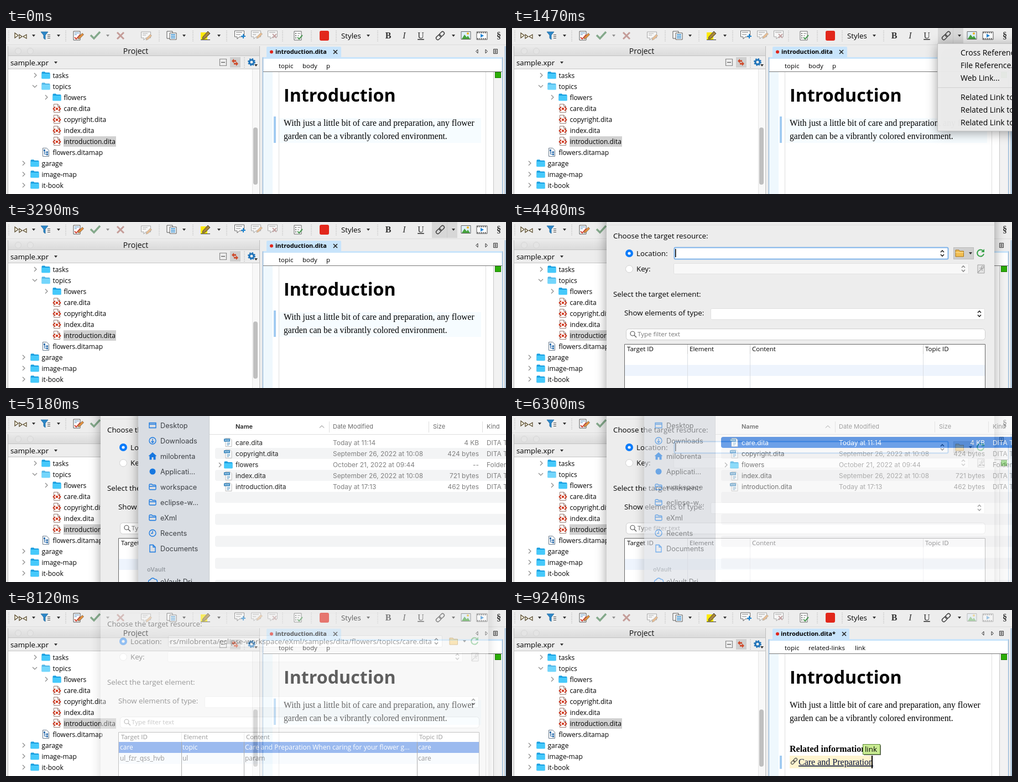
An HTML page that plays this animation: 904 px wide and 302 px high, repeating every 9590 ms.

```html
<!DOCTYPE html>
<html lang="en">
<head>
<meta charset="utf-8">
<title>Adding a related link</title>
<style>
html, body { margin: 0; width: 100%; height: 100%; overflow: hidden; background: #ededed; }
body > svg { display: block; width: 100vw; height: 100vh; }
text { font: 500 12px "Open Sans", sans-serif; white-space: pre; }
.ui text, text.ui { font-size: 13.3px; }
.small text, text.small { font-size: 11.5px; }
.menu text { font-size: 14px; }
.serif text { font: 16px "Liberation Serif", serif; }
.serif .para { font-size: 15.65px; }
.serif .bold { font-weight: 700; }
.tab text { font-size: 10.9px; font-weight: 700; }
.side text { font: 12.7px Inter, sans-serif; fill: #3d4045; }
.files text { font: 11.9px Inter, sans-serif; fill: #252525; }
.files .dim text { fill: #808080; }
.files .head text { font-size: 11px; fill: #6d6d6d; }
.line { fill: none; stroke: #555; stroke-width: 1.2; }
.line.pale { stroke: #888; }
.line.cross { stroke: #222; stroke-width: 1.6; }
.blue { fill: none; stroke: #1677e0; stroke-width: 1.3; }
.off { opacity: .5; }
.shadow { filter: drop-shadow(0 3px 10px rgba(0, 0, 0, .38)); }

/* Hard cuts on one shared timeline. */
[class*="at-"] { animation: 9.59s step-end infinite; opacity: 0; }
.at-button { animation-name: button; }
.at-menu { animation-name: menu; }
.at-item1 { animation-name: item1; }
.at-item2 { animation-name: item2; }
.at-item3 { animation-name: item3; }
.at-item4 { animation-name: item4; }
.at-dialog { animation-name: dialog; }
.at-caret { animation-name: caret; }
.at-browse { animation-name: browse; }
.at-finder { animation-name: finder; }
.at-picked { animation-name: picked; }
.at-path { animation-name: path; }
.at-focus { animation-name: focus; }
.at-marked { animation-name: marked; }
.at-rows { animation-name: rows; }
.at-before { animation-name: before; }
.at-after { animation-name: after; }
.at-end { animation-name: end; }
@keyframes button { 0% { opacity: 0 } 11.678% { opacity: 1 } 84.671%, 100% { opacity: 0 } }
@keyframes menu { 0% { opacity: 0 } 14.598% { opacity: .7 } 15.327% { opacity: 1 } 33.576% { opacity: .45 } 34.306%, 100% { opacity: 0 } }
@keyframes item1 { 0% { opacity: 0 } 20.437% { opacity: 1 } 22.627%, 100% { opacity: 0 } }
@keyframes item2 { 0% { opacity: 0 } 22.627% { opacity: 1 } 24.087%, 100% { opacity: 0 } }
@keyframes item3 { 0% { opacity: 0 } 24.087% { opacity: 1 } 26.277%, 100% { opacity: 0 } }
@keyframes item4 { 0% { opacity: 0 } 28.467% { opacity: 1 } 34.306%, 100% { opacity: 0 } }
@keyframes dialog { 0% { opacity: 0 } 35.036% { opacity: .6 } 35.766% { opacity: 1 } 84.671% { opacity: .4 } 85.4%, 100% { opacity: 0 } }
@keyframes caret { 0% { opacity: 1 } 40.875% { opacity: 0 } 45.985% { opacity: 1 } 66.423%, 100% { opacity: 0 } }
@keyframes browse { 0% { opacity: 0 } 43.065% { opacity: .6 } 45.985% { opacity: 1 } 66.423%, 100% { opacity: 0 } }
@keyframes finder { 0% { opacity: 0 } 49.635% { opacity: .2 } 50.364% { opacity: .45 } 51.094% { opacity: .7 } 51.824% { opacity: .9 } 52.554% { opacity: 1 } 65.693% { opacity: .6 } 66.423% { opacity: .25 } 67.153%, 100% { opacity: 0 } }
@keyframes picked { 0% { opacity: 0 } 62.043%, 100% { opacity: 1 } }
@keyframes path { 0% { opacity: 0 } 66.423%, 100% { opacity: 1 } }
@keyframes focus { 0% { opacity: 1 } 83.211%, 100% { opacity: 0 } }
@keyframes marked { 0% { opacity: 0 } 66.423% { opacity: 1 } 83.211%, 100% { opacity: 0 } }
@keyframes rows { 0% { opacity: 0 } 72.262%, 100% { opacity: 1 } }
@keyframes before { 0% { opacity: 1 } 89.78%, 100% { opacity: 0 } }
@keyframes after { 0% { opacity: 0 } 89.78%, 100% { opacity: 1 } }
@keyframes end { 0% { opacity: 0 } 96.35%, 100% { opacity: 1 } }
</style>
</head>
<body>
<svg viewBox="0 0 904 302" preserveAspectRatio="none">
<defs>
  <path id="down" d="M-3-2h6L0 2z" fill="#333"/>
  <path id="sep" d="M0-9V10" stroke="#999" stroke-dasharray="1 2"/>
  <path id="closed" class="line pale" d="M-2-4l4 4-4 4"/>
  <path id="open" class="line pale" d="M-4-2l4 4 4-4"/>
  <g id="folder"><path d="M-7.5-5q0-1.5 1.5-1.5h4L-.5-5H6q1.500 0 1.500 1.500V6h-15z" fill="#1b9fe0"/><path d="M-7.500-3h15v8q0 1.500-1.500 1.500H-6q-1.500 0-1.500-1.500z" fill="#45c9fb"/></g>
  <g id="dita"><path d="M-5.5-7.5h7l4 4v11h-11z" fill="#fff" stroke="#9a7b72"/><path d="M1.500-7.500v4h4" fill="none" stroke="#9a7b72"/><path d="M-3-2.500L-6.500 1-3 4.500M3-2.500L6.500 1 3 4.500" fill="none" stroke="#c8371f" stroke-width="1.800"/><circle cy="1" r="2.300" fill="#d5432a"/></g>
  <g id="map"><path d="M-5.5-7.5h7l4 4v11h-11z" fill="#fff" stroke="#66788a"/><path d="M-2.5-4v7.500h4M-2.500 0h4" fill="none" stroke="#2b6cab"/><path d="M-4-5h3v3h-3zM1-1.500h3v3H1zM1 2.500h3v3H1z" fill="#2b6cab"/></g>
  <path id="bubble" d="M-8.500-8h17V3H0l-4 4V3h-4.500z" fill="#fff" stroke="#666"/>
  <path id="pencil" d="M-4 4l1-3.500L4-6.500 6.500-4-.500 3z" fill="#e89139" stroke="#6b5a45" stroke-width=".8"/>
  <g id="chain" fill="none" stroke="#444" stroke-width="1.300" transform="rotate(-45)"><rect x="-8" y="-2.700" width="9" height="5.400" rx="2.700"/><rect x="-1" y="-2.700" width="9" height="5.400" rx="2.700"/></g>
  <path id="spin" d="M-3-2L0-5l3 3M-3 2l3 3 3-3" fill="none" stroke="#222" stroke-width="1.600"/>
  <path id="sidefolder" class="blue" d="M-6-3.500q0-1.500 1.500-1.500h3L0-3.500h4.500Q6-3.500 6-2v5.500Q6 5 4.500 5h-9Q-6 5-6 3.500zM-6-1H6"/>
  <g id="file"><path d="M-5-7.500H3l3 3v12H-5z" fill="#fff" stroke="#aaa" stroke-width=".8"/><path d="M-8-6.500H3v5H-8z" fill="#2378b5"/><path d="M-6.500-4h8" stroke="#d7ecfa" stroke-width="2" stroke-dasharray="1.500 .7"/><path d="M-2.500 1H3M-2.500 3H3M-2.500 5H1" stroke="#4a8dbb" stroke-width=".9"/></g>
  <pattern id="stripes" patternUnits="userSpaceOnUse" x="378" y="58" width="540" height="40"><rect width="540" height="20" rx="4" fill="#f3f4f5"/></pattern>
  <linearGradient id="bar" x2="0" y2="1"><stop stop-color="#e9e9e9"/><stop offset="1" stop-color="#dadada"/></linearGradient>
</defs>

<rect width="904" height="302" fill="#ededed"/>

<!-- Toolbar -->
<path d="M0 30.5H904" stroke="#dcdcdc"/>
<g>
  <use href="#sep" x="5" y="14"/><use href="#sep" x="108" y="14"/><use href="#sep" x="277" y="14"/><use href="#sep" x="338" y="14"/><use href="#sep" x="399" y="14"/><use href="#sep" x="500" y="14"/><use href="#sep" x="552" y="14"/><use href="#sep" x="597" y="14"/><use href="#sep" x="672" y="14"/>
  <path d="M16 9v9l6-4.500zM24 12v7l5-3.500zM37 12v7l-6-3.500z" fill="#fffbe8" stroke="#54462a" stroke-width="1.200"/>
  <path d="M63 7h13l-5 6v8l-3-2.500V13z" fill="#2d87c8" stroke="#1d679f" stroke-width=".8"/><path d="M75 12.500h5M75 15.500h5M75 18.500h5" stroke="#555"/>
  <path d="M122 6h12v16h-12z" fill="#fff" stroke="#555"/><path d="M124 9h8M124 12h4" stroke="#4280b9"/><path d="M124 17l3 3 7-8" stroke="#d33c2c" stroke-width="1.800" fill="none"/><use href="#pencil" x="134" y="16"/>
  <path d="M153 13l6 6L170 7" fill="none" stroke="#84a98b" stroke-width="3.500"/>
  <path d="M201 8l12 12M213 8l-12 12" stroke="#c49c98" stroke-width="3"/>
  <g class="off"><use href="#bubble" x="253" y="15"/><path d="M247 10h9M247 13h6" stroke="#777"/><use href="#pencil" x="257" y="18"/></g>
  <path d="M291 6h10v13h-10z" fill="#fff" stroke="#555"/><path d="M296 9h12v12h-12z" fill="#fff" stroke="#555"/><path d="M298 12h8M298 15h8M298 18h8" stroke="#2987cb" stroke-width="1.300"/>
  <path d="M352 8h12v13h-12z" fill="#ffe900"/><path d="M356 16l9-10 4 4-9 9-5 1z" fill="#a8863c" stroke="#444"/><path d="M352 21.500h17" stroke="#333"/>
  <use href="#bubble" x="422" y="13"/><path d="M416 8h11M416 12h8" stroke="#777"/><path d="M429 11v8M425 15h8" stroke="#1e85d2" stroke-width="2"/>
  <g class="off"><g fill="#ddd"><use href="#bubble" x="452" y="13"/><use href="#bubble" x="482" y="13"/></g><path d="M446 8h11M446 12h6M476 8h11" stroke="#555"/><use href="#pencil" x="457" y="15"/><path d="M482 11l7 7M489 11l-7 7" stroke="#955" stroke-width="1.800"/></g>
  <path d="M521 6h13v16h-13z" fill="#fff" stroke="#666"/><path d="M523 10h2M523 14h2M523 18h2" stroke="#777" stroke-width="2"/><path d="M527 10h5M527 14h3" stroke="#777"/><path d="M527 17l3 3 6-7" fill="none" stroke="#4d9956" stroke-width="2"/>
  <rect x="567" y="5" width="17" height="18" rx="3" fill="#e2271b"/>
  <text class="ui" x="606" y="19">Styles</text>
</g>
<g class="at-button"><rect x="770" width="46" height="29" fill="#d7d7d7"/><path d="M797.5 0v29" stroke="#cacaca"/></g>
<g class="serif" text-anchor="middle" fill="#333"><text class="bold" x="691" y="19">B</text><text x="720" y="19" style="font-style:italic">I</text><text x="750" y="19" text-decoration="underline">U</text><text class="bold" x="891" y="19">§</text></g>
<use href="#chain" transform="translate(785 14) scale(1.15)"/>
<use href="#down" x="50" y="14"/><use href="#down" x="95" y="14"/><use href="#down" x="184" y="14" class="off"/><use href="#down" x="322" y="14"/><use href="#down" x="385" y="14"/><use href="#down" x="655" y="14"/><use href="#down" x="809" y="14"/>
<path d="M823 6.5h17v14h-17z" fill="#dff0fb" stroke="#666"/><path d="M824 20l5-8 4 5 2-3 4 6z" fill="#46a33d"/><circle cx="835" cy="10" r="2" fill="#eeb31d"/>
<path d="M851 7h19v14h-19z" fill="#fff" stroke="#555"/><path d="M852 8.5h17M852 19.5h17" stroke="#555" stroke-width="2" stroke-dasharray="2 1.5"/><path d="M858 10.5v7l6-3.5z" fill="#2384d4"/>
<path class="at-after" d="M821 4h51v20h-51z" fill="#ededed" fill-opacity=".62"/>

<!-- Project view -->
<path d="M3.5 33v269M458.5 33v269" stroke="#bdbdbd"/>
<rect x="4" y="33" width="454" height="18" fill="url(#bar)"/>
<g fill="#e4e4e4" stroke="#d6d6d6"><circle cx="22" cy="42" r="5.5"/><circle cx="44" cy="42" r="5.5"/></g>
<text x="234.5" y="47" text-anchor="middle" style="font-size:14px" fill="#111">Project</text>
<path d="M4 50.5h454" stroke="#c4c4c4"/>
<text class="ui" x="8" y="68">sample.xpr</text><use href="#down" x="90" y="63"/>
<rect x="405" y="53" width="19" height="19" fill="#cfcfcf"/>
<path class="line pale" d="M386.5 56.500h12v12h-12z"/><path class="line" d="M389 62.500h7"/>
<path d="M408 60l4-4v2.500h4v3h-4V64zM420 65l-4-4v2.500h-4v3h4V69z" fill="#cf4a2a"/>
<use href="#sep" x="431" y="62"/>
<circle cx="444" cy="62" r="4" fill="none" stroke="#1e72b8" stroke-width="3"/><circle cx="444" cy="62" r="6" fill="none" stroke="#1e72b8" stroke-width="2" stroke-dasharray="2.4 2.312"/><use href="#down" x="452" y="68"/>
<rect x="4" y="75" width="454" height="227" fill="#fff"/>
<path d="M4 74.5h454" stroke="#c4c4c4"/>
<rect x="446" y="75" width="11" height="227" fill="#f8f8f8"/><path d="M445.5 75v227" stroke="#e6e6e6"/>
<rect x="447" y="181" width="8" height="104" rx="4" fill="#bfbfbf"/>
<rect x="104" y="197" width="95" height="19" fill="#d1d1d1"/>
<g>
  <use href="#closed" x="53" y="86"/><use href="#folder" x="72" y="86"/><text x="84.5" y="91">tasks</text>
  <use href="#open" x="52" y="106"/><use href="#folder" x="72" y="106" opacity=".75"/><text x="84.5" y="111">topics</text>
  <use href="#closed" x="73" y="126"/><use href="#folder" x="92" y="126"/><text x="104.5" y="131">flowers</text>
  <use href="#dita" x="92" y="146"/><text x="104.5" y="151">care.dita</text>
  <use href="#dita" x="92" y="166"/><text x="104.5" y="171">copyright.dita</text>
  <use href="#dita" x="92" y="186"/><text x="104.5" y="191">index.dita</text>
  <use href="#dita" x="92" y="206"/><text x="104.5" y="211">introduction.dita</text>
  <use href="#map" x="72" y="226"/><text x="84.5" y="231">flowers.ditamap</text>
  <use href="#closed" x="32" y="246"/><use href="#folder" x="52" y="246"/><text x="64.5" y="251">garage</text>
  <use href="#closed" x="32" y="266"/><use href="#folder" x="52" y="266"/><text x="64.5" y="271">image-map</text>
  <use href="#closed" x="32" y="286"/><use href="#folder" x="52" y="286"/><text x="64.5" y="291">it-book</text>
</g>

<!-- Editor -->
<path d="M471 54V36q0-2 2-2h131q2 0 2 2v18z" fill="#c8e4fb"/>
<rect x="464" y="53" width="434" height="249" fill="#fff"/>
<path d="M464.5 302V54H897.5V302M902.5 33v269" fill="none" stroke="#8fb4d6" stroke-width="1.5"/>
<rect x="465" y="53" width="432" height="3" fill="#c8e4fb"/>
<path d="M465 79.5H897" stroke="#777"/>
<circle cx="480" cy="43.5" r="3" fill="#e0261c"/>
<path d="M853 39v7l-3.500-3.500zM867 39v7l3.500-3.500z" fill="none" stroke="#333"/>
<path d="M881.5 38.500h7v8h-7zM883 40.500h4M883 42.500h4M883 44.500h4" fill="none" stroke="#333"/>
<rect x="465" y="80" width="17" height="222" fill="#eff8fd"/>
<path d="M493.5 80v222M867.5 80v222" stroke="#dedede"/><path d="M881.5 80v222" stroke="#c7c7c7"/>
<rect x="882" y="80" width="15" height="222" fill="#f2f2f2"/>
<rect x="884.5" y="80.5" width="10" height="10" fill="#2bae08" stroke="#1c7d03"/>
<g class="at-before">
  <g class="tab"><text x="487" y="47">introduction.dita</text></g><path class="line cross" d="M592 40l7 7M599 40l-7 7"/>
  <g class="small"><text x="493" y="73">topic</text><text x="536" y="73">body</text><text x="579" y="73">p</text></g>
  <rect x="494" y="164" width="365" height="45" fill="#f6fcff"/><rect x="484" y="161" width="4" height="48" fill="#a2cbf1"/>
</g>
<g class="at-after">
  <path d="M600 54V34h8q2 0 2 2v18z" fill="#c8e4fb"/>
  <g class="tab"><text x="486" y="47">introduction.dita*</text></g><path class="line cross" d="M597 40l7 7M604 40l-7 7"/>
  <g class="small"><text x="493" y="73">topic</text><text x="536" y="73">related-links</text><text x="620" y="73">link</text></g>
  <rect x="502" y="265" width="150" height="23" fill="#fff4cf"/><rect x="484" y="265" width="4" height="24" fill="#a2cbf1"/>
  <g class="serif"><text class="bold" x="502" y="258">Related information</text><text x="518" y="282" fill="#04123c" text-decoration="underline">Care and Preparation</text></g>
  <use href="#chain" transform="translate(510 275) scale(.85)"/>
  <rect x="636" y="246" width="31" height="18" fill="#666"/><rect x="634.5" y="244.5" width="31" height="18" fill="#c9eb93" stroke="#5d8a36"/><text class="ui" x="638" y="258">link</text>
</g>
<text x="502" y="134" style="font-size:32.2px;font-weight:700">Introduction</text>
<g class="serif"><text class="para" x="502" y="178">With just a little bit of care and preparation, any flower</text><text class="para" x="502" y="202">garden can be a vibrantly colored environment.</text></g>
<rect class="at-end" x="650" y="265" width="2" height="23"/>

<!-- Link menu -->
<g class="at-menu menu">
  <rect class="shadow" x="769.5" y="28.5" width="200" height="159" fill="#ededed" fill-opacity=".96" stroke="#c2c2c2"/>
  <path d="M770 108.5h134" stroke="#d0d0d0"/>
  <text x="811" y="50">Cross Reference...</text><text x="811" y="73">File Reference...</text><text x="811" y="96">Web Link...</text><text x="811" y="131">Related Link to Topic...</text><text x="811" y="154">Related Link to File...</text><text x="811" y="177">Related Link to Web Page...</text>
  <g fill="#fff">
    <g class="at-item1"><rect x="770" y="34" width="134" height="23" fill="#2f7af0"/><text x="811" y="50">Cross Reference...</text></g>
    <g class="at-item2"><rect x="770" y="57" width="134" height="23" fill="#2f7af0"/><text x="811" y="73">File Reference...</text></g>
    <g class="at-item3"><rect x="770" y="80" width="134" height="23" fill="#2f7af0"/><text x="811" y="96">Web Link...</text></g>
    <g class="at-item4"><rect x="770" y="115" width="134" height="23" fill="#2f7af0"/><text x="811" y="131">Related Link to Topic...</text></g>
  </g>
</g>

<!-- Link dialog -->
<g class="at-dialog">
  <rect class="shadow" x="171" y="-30" width="701" height="360" fill="#ededed"/>
  <path d="M171 5.5h701" stroke="#dedede"/>
  <g class="ui"><text x="183" y="30">Choose the target resource:</text><text x="225" y="62">Location:</text><text x="225" y="90">Key:</text><text x="183" y="136">Select the target element:</text><text x="203" y="170">Show elements of type:</text></g>
  <circle cx="212" cy="57" r="7" fill="#0a7bfa"/><circle cx="212" cy="57" r="2.6" fill="#fff"/><circle cx="212" cy="85.5" r="6.5" fill="#fff" stroke="#d2d2d2"/>
  <rect x="293.5" y="46.5" width="495" height="21" rx="2" fill="#fff" stroke="#cfcfcf"/>
  <rect class="at-focus" x="293.5" y="46.5" width="495" height="21" rx="2" fill="none" stroke="#7eb3ea" stroke-width="2"/>
  <rect class="at-marked" x="294" y="48" width="476" height="18" fill="#a4cdfd"/>
  <svg class="at-path ui" x="295" y="46" width="476" height="22"><text x="475" y="16" text-anchor="end">/Users/milobrenta/eclipse-workspace/eXml/samples/dita/flowers/topics/care.dita</text></svg>
  <rect class="at-caret" x="295" y="49" width="1.5" height="15"/>
  <use href="#spin" x="778" y="57"/>
  <rect x="292.5" y="75.5" width="533" height="19" rx="2" fill="#f8f8f8" stroke="#e1e1e1"/><use href="#spin" x="816" y="85" class="off"/>
  <rect class="at-browse" x="798.5" y="46.5" width="36" height="21" fill="#cfcfcf" stroke="#bbb"/>
  <path d="M802 51h6l1.5 2h7v10H802z" fill="#f1be52" stroke="#a77517"/><path d="M802 55.5h14.5" stroke="#ffe39c"/><use href="#down" x="829" y="57"/>
  <path d="M852 53a6 6 0 1 0 1 5" fill="none" stroke="#35a047" stroke-width="2"/><path d="M854 49v6h-6z" fill="#35a047"/>
  <g class="off"><path d="M842 78h12v15h-12z" fill="#ddd" stroke="#555"/><path d="M842 92l7-7M845 84h5v5" class="line"/><circle cx="851" cy="82" r="2" class="line"/></g>
  <rect x="359.5" y="157.5" width="495" height="20" rx="2" fill="#fff" stroke="#dfdfdf"/><use href="#spin" x="845" y="167"/>
  <rect x="206.5" y="194.5" width="649" height="20" rx="5" fill="#fff" stroke="#cfcfcf"/>
  <circle cx="218" cy="203" r="4" class="line"/><path class="line" d="M221 206l4 4"/>
  <text class="small" x="227" y="208" fill="#777">Type filter text</text>
  <rect x="203" y="222" width="653" height="80" fill="#fff"/><rect x="204" y="260" width="651" height="20" fill="#eef4fd"/>
  <path d="M317.5 240v62M430.5 240v62M743.5 240v62" stroke="#d9dde3"/>
  <path d="M317.5 223v17M430.5 223v17M743.5 223v17" stroke="#ccc"/>
  <g class="small"><text x="208" y="235">Target ID</text><text x="321" y="235">Element</text><text x="434" y="235">Content</text><text x="747" y="235">Topic ID</text></g>
  <g class="at-rows">
    <rect x="204" y="240" width="651" height="20" fill="#0553d6"/><path d="M317.5 240v62M430.5 240v62M743.5 240v62" stroke="#333"/>
    <g fill="#fff"><text x="206" y="254">care</text><text x="319" y="254">topic</text><text x="432" y="254">Care and Preparation When caring for your flower g...</text><text x="745" y="254">care</text></g>
    <text x="206" y="274">ul_fzr_qss_hvb</text><text x="319" y="274">ul</text><text x="432" y="274">param</text><text x="745" y="274">care</text>
  </g>
  <path d="M203.5 302V222.5H855.5V302" fill="none" stroke="#666"/>
</g>

<!-- File chooser -->
<g class="at-finder">
  <rect class="shadow" x="239" y="-30" width="700" height="370" fill="#d9dde3"/>
  <rect x="368" width="536" height="302" fill="#fff"/><path d="M367.5 0v302" stroke="#c9cdd2"/>
  <g class="side">
    <path class="blue" d="M259 12.5h12v9h-12zM259 15h12"/><text x="279" y="22">Desktop</text>
    <circle class="blue" cx="265" cy="45" r="6"/><path class="blue" d="M265 41.5v6.5M262.5 46l2.5 2.5 2.5-2.5"/><text x="279" y="50">Downloads</text>
    <path d="M257.5 73l7.5-7 7.5 7h-2v6.5h-4V75h-3v4.5h-4V73z" fill="#1677e0"/><text x="279" y="78">milobrenta</text>
    <circle cx="265" cy="101" r="5.5" fill="#1677e0"/><text x="279" y="106">Applicati...</text>
    <use href="#sidefolder" x="265" y="129"/><text x="279" y="134">workspace</text>
    <use href="#sidefolder" x="265" y="157"/><text x="279" y="162">eclipse-w...</text>
    <use href="#sidefolder" x="265" y="185"/><text x="279" y="190">eXml</text>
    <circle class="blue" cx="265" cy="213" r="6"/><path class="blue" d="M265 209v4.5h-3"/><text x="279" y="218">Recents</text>
    <path class="blue" d="M260 234.5h6l4 4v9h-10zM266 234.5v4h4"/><text x="279" y="246">Documents</text>
    <text x="255" y="283" style="font-size:11px;font-weight:600;fill:#979ca3">oVault</text>
    <path class="blue" d="M261 305a3.5 3.5 0 0 1 0-7 4.5 4.5 0 0 1 8-1 4 4 0 0 1 1 8z"/><text x="279" y="306">oVault Dri...</text>
  </g>
  <g class="files">
    <rect x="378" y="58" width="526" height="244" fill="url(#stripes)"/>
    <path d="M368 33.5h536M584.5 10v20M764.5 10v20M861.5 10v20" stroke="#dedede"/>
    <g class="head"><text x="415" y="23" style="fill:#252525;font-weight:600">Name</text><text x="591" y="23">Date Modified</text><text x="772" y="23">Size</text><text x="869" y="23">Kind</text></g>
    <path d="M567 21.5l4-4 4 4" fill="none" stroke="#777"/>
    <text x="415" y="53">care.dita</text><text x="415" y="73">copyright.dita</text><text x="415" y="93">flowers</text><text x="415" y="113">index.dita</text><text x="415" y="133">introduction.dita</text>
    <g class="dim"><text x="591" y="53">Today at 11:14</text><text x="591" y="73">September 26, 2022 at 10:08</text><text x="591" y="93">October 21, 2022 at 09:44</text><text x="591" y="113">September 26, 2022 at 10:08</text><text x="591" y="133">Today at 17:13</text></g>
    <g class="dim" text-anchor="end"><text x="855" y="53">4 KB</text><text x="855" y="73">424 bytes</text><text x="855" y="93">--</text><text x="855" y="113">721 bytes</text><text x="855" y="133">462 bytes</text></g>
    <g class="dim"><text x="869" y="53">DITA Topic</text><text x="869" y="73">DITA Topic</text><text x="869" y="93">Folder</text><text x="869" y="113">DITA Topic</text><text x="869" y="133">DITA Topic</text></g>
    <g class="at-picked"><rect x="378" y="38" width="540" height="20" rx="4" fill="#0b62d9"/>
      <g style="filter:brightness(0) invert(1)"><text x="415" y="53">care.dita</text><text x="591" y="53">Today at 11:14</text><text x="855" y="53" text-anchor="end">4 KB</text><text x="869" y="53">DITA Topic</text></g></g>
    <use href="#file" x="402" y="48"/><use href="#file" x="402" y="69"/><use href="#folder" x="402" y="89"/><use href="#file" x="402" y="109"/><use href="#file" x="402" y="129"/>
    <path class="line pale" d="M385 85l4 4-4 4"/>
  </g>
</g>
</svg>
</body>
</html>
```
